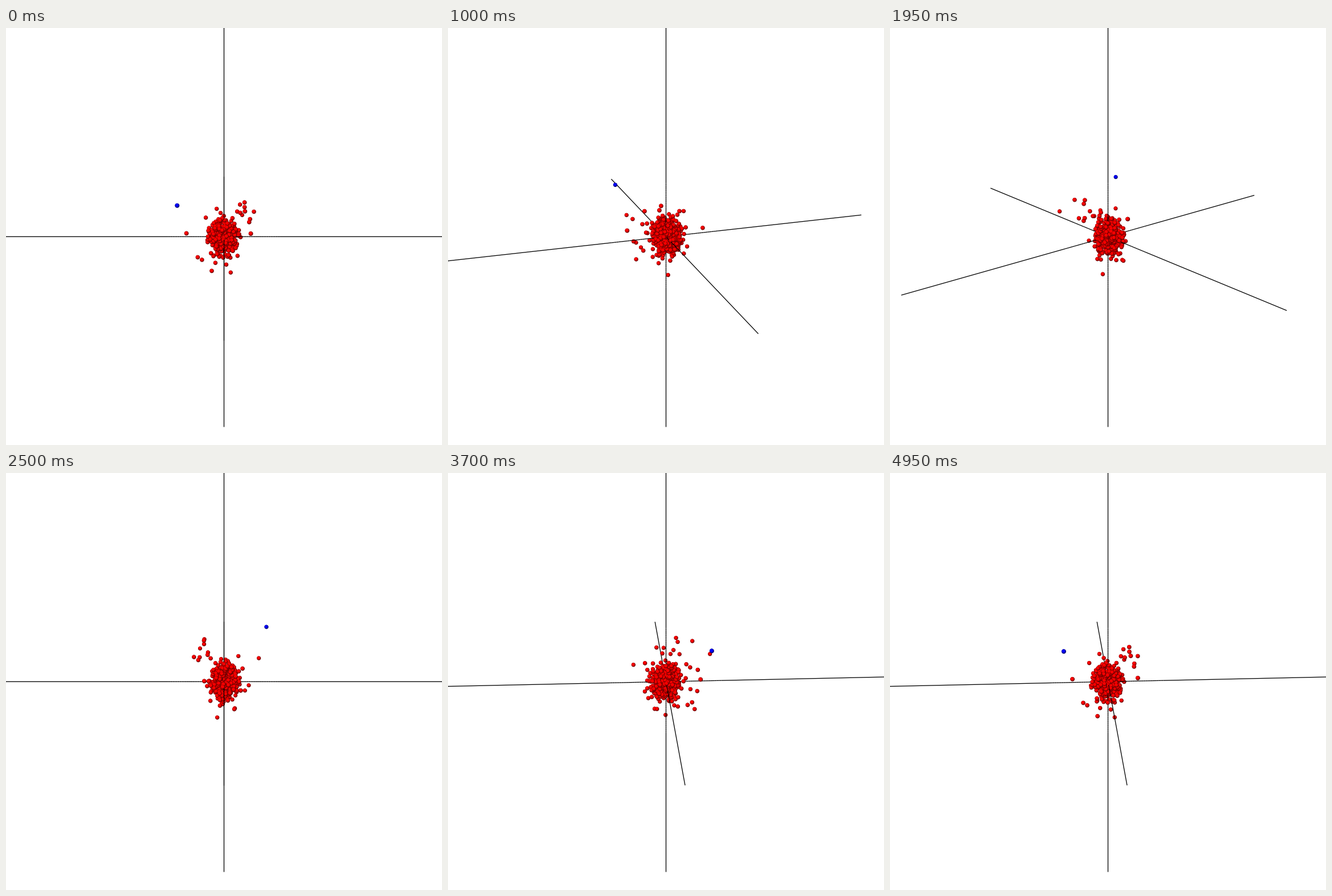
A matplotlib script that plays this animation: 765 by 732 pixels, repeating every 5000 ms.

```python
import numpy as np
import matplotlib.pyplot as plt
from matplotlib.animation import FuncAnimation
from matplotlib.collections import PolyCollection

W, H = 765, 732
FRAMES, INTERVAL = 100, 50
CX, CY = 382.5, 366.3
FOCAL = (H / 2) / np.tan(np.radians(15))
DIST = 3.5                                # camera distance, axis half-length = 1
SIN_E, COS_E = np.sin(np.radians(20)), np.cos(np.radians(20))
UNIT = FOCAL / DIST                       # pixels per unit at the origin
RADIUS = 0.0096
LINE_W = 1.3
SIDES = 16

# Stray balls around the core: x, lowered height, z in pixels
STRAYS = np.array([
    (44, -33, 82), (-63, -24, 54), (12, 64, 0), (-21, 42, 49), (-45, 21, 42),
    (-38, 28, 35), (4, 44, 15), (-15, 39, 20), (24, 34, 0), (-32, -28, -16),
    (-13, -37, -37), (-6, -34, -23), (35, -65, 20), (35, -58, 23),
    (28, -51, -15), (52, -43, -1), (35, -59, 49), (33, -20, -56),
    (23, -42, -5), (45, -34, 11), (43, -34, 27), (28, -46, 15),
    (-22, 10, 53), (-26, -28, 53), (8, 17, 44), (-3, -25, 42), (5, -28, 36),
    (-8, -8, 34), (13, -17, -32), (7, 19, -37), (7, 31, -31), (-3, 10, -33),
    (-18, 41, -21), (-19, 41, -17),
], float)


def make_balls():
    rng = np.random.default_rng(7)
    core = rng.normal(size=(1200, 3)) * (13, 15.5, 13)
    core = core[np.linalg.norm(core / (1, 1.1, 1), axis=1) < 34][:430]
    core[:, 1] += 1
    px = np.vstack([STRAYS, core])
    pts = px * (1, -1 / COS_E, 1) / UNIT
    phi = np.radians(86.8 * 3.6)
    blue = (0.266 * np.sin(phi), 0.204, 0.266 * np.cos(phi))
    return np.vstack([pts, blue])


def make_axes():
    """Short pieces near the core so that balls can cover them one by one."""
    t = np.append(np.linspace(0, 0.25, 26), 1)
    starts, ends = [], []
    for axis in np.vstack([np.eye(3), -np.eye(3)]):
        starts.append(t[:-1, None] * axis)
        ends.append(t[1:, None] * axis)
    return np.vstack(starts), np.vstack(ends)


def project(p, angle):
    c, s = np.cos(angle), np.sin(angle)
    x = p[:, 0] * c - p[:, 2] * s
    z = p[:, 2] * c + p[:, 0] * s
    y = p[:, 1]
    depth = DIST - z * COS_E - y * SIN_E
    scale = FOCAL / depth
    xy = np.column_stack([CX + x * scale, CY + (z * SIN_E - y * COS_E) * scale])
    return xy, depth


BALLS = make_balls()
STARTS, ENDS = make_axes()
turn = np.linspace(0, 2 * np.pi, SIDES, endpoint=False)
CIRCLE = np.column_stack([np.cos(turn), np.sin(turn)])

# Shading layers: relative radius, shift and brightness
LAYERS = [(1.0, (0, 0), 0.42), (0.84, (-0.10, -0.13), 0.78), (0.62, (-0.16, -0.22), 1.0)]
SHAPES = np.array([CIRCLE * r + shift for r, shift, _ in LAYERS])
ball_rgb = np.zeros((len(BALLS), len(LAYERS), 3))
ball_rgb[:, :, 0] = [b for _, _, b in LAYERS]
ball_rgb[-1] = ball_rgb[-1][:, ::-1]
COLORS = np.vstack([ball_rgb.reshape(-1, 3), np.zeros((len(STARTS), 3))])


def ball_polys(angle):
    xy, depth = project(BALLS, angle)
    r = RADIUS * FOCAL / depth
    polys = xy[:, None, None] + SHAPES[None] * r[:, None, None, None]
    return polys.reshape(-1, SIDES, 2), np.repeat(depth, len(LAYERS))


def line_polys(angle):
    a, da = project(STARTS, angle)
    b, db = project(ENDS, angle)
    along = b - a
    length = np.maximum(np.hypot(along[:, 0], along[:, 1]), 1e-6)[:, None]
    side = np.column_stack([-along[:, 1], along[:, 0]]) / length * LINE_W / 2
    quads = np.stack([a + side, b + side, b - side, a - side], axis=1)
    return np.repeat(quads, SIDES // 4, axis=1), (da + db) / 2


fig = plt.figure(figsize=(W / 100, H / 100), dpi=100, facecolor="white")
ax = fig.add_axes([0, 0, 1, 1])
ax.set_xlim(0, W)
ax.set_ylim(H, 0)
ax.axis("off")
scene = PolyCollection([], linewidths=0, edgecolors="none")
scene.set_snap(False)
ax.add_collection(scene, autolim=False)


def update(frame):
    angle = 2 * np.pi * frame / FRAMES
    balls, ball_depth = ball_polys(angle)
    lines, line_depth = line_polys(angle)
    order = np.argsort(-np.concatenate([ball_depth, line_depth]), kind="stable")
    scene.set_verts(np.concatenate([balls, lines])[order])
    scene.set_facecolor(COLORS[order])
    return [scene]


anim = FuncAnimation(fig, update, frames=FRAMES, interval=INTERVAL,
                     repeat=True, repeat_delay=0, blit=False)
plt.show()
```
